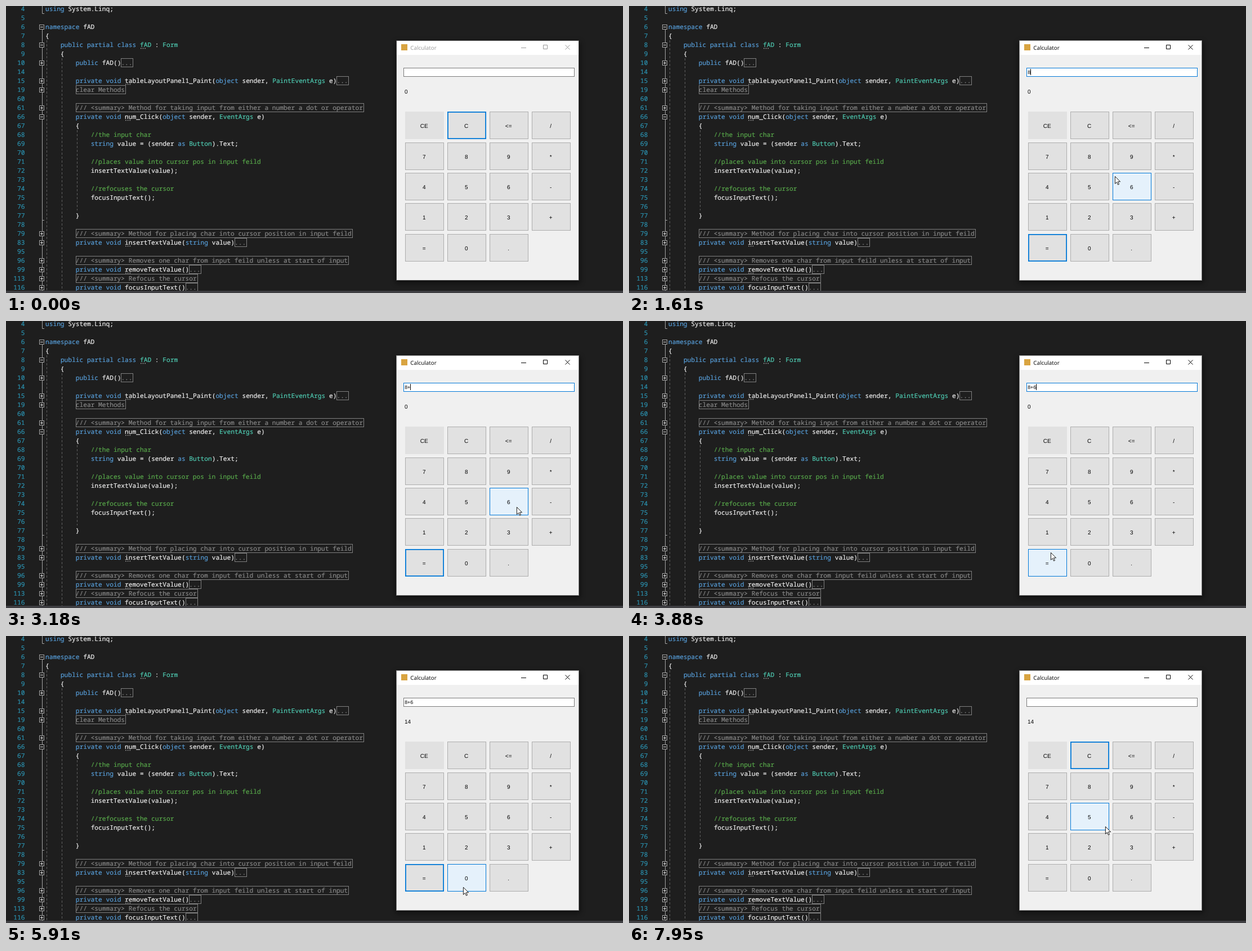
An HTML page that plays this animation: 1096 px wide and 511 px high, repeating every 8 s.

```html
<!DOCTYPE html>
<html lang="en">
<head>
<meta charset="utf-8">
<title>Calculator</title>
<style>
  html, body { margin: 0; width: 100%; height: 100%; overflow: hidden; background: #1e1e1e; }
  svg { display: block; width: 100vw; height: 100vh; }
  text { white-space: pre; text-rendering: geometricPrecision; }
  .code text { font: 11.2px "Noto Sans Mono", "DejaVu Sans Mono", monospace; stroke-width: .22px; }
  .ui text { font: 10px "Liberation Sans", Arial, sans-serif; }
  .ui .title { font: 9.9px "Open Sans", "Noto Sans", sans-serif; }
  .ui .typed { font-size: 8.9px; }
</style>
</head>
<body>
<svg viewBox="0 0 1096 511">
  <defs>
    <filter id="blur" x="-20%" y="-20%" width="140%" height="140%"><feGaussianBlur stdDeviation="5"/></filter>
  </defs>
  <rect width="1096" height="511" fill="#1e1e1e"/>
  <g class="code" id="code"></g>
  <rect y="507" width="1096" height="4" fill="#3e3e42"/>
  <g class="ui" id="ui"></g>
</svg>
<script>
const LOOP = 8000, STEP = 78.1, FIRST_STEP = 275;
const CHAR = 6.72, LEFT = 70, LINE = 16;
const BLUE = '#0078d7';
const code = document.getElementById('code');
const ui = document.getElementById('ui');

function add(parent, tag, attrs, text) {
  const el = document.createElementNS('http://www.w3.org/2000/svg', tag);
  set(el, attrs);
  if (text !== undefined) el.textContent = text;
  return parent.appendChild(el);
}
function set(el, attrs) {
  for (const key in attrs) el.setAttribute(key, attrs[key]);
}
const path = (parent, d, stroke, extra) => add(parent, 'path', { d, stroke, fill: 'none', ...extra });
const codeText = (x, y, fill, text, extra) => add(code, 'text', { x, y: y + 3.8, fill, stroke: fill, ...extra }, text);

// Editor: number | fold sign | code, with collapsed parts in square brackets
const listing = `4||using System.Linq;
5||
6|-|namespace fAD
7||{
8|-|    public partial class fAD : Form
9||    {
10|+|        public fAD()[...]
14||
15|+|        private void tableLayoutPanel1_Paint(object sender, PaintEventArgs e)[...]
19|+|        [clear Methods]
60||
61|+|        [/// <summary> Method for taking input from either a number a dot or operator]
66|-|        private void num_Click(object sender, EventArgs e)
67||        {
68||            //the input char
69||            string value = (sender as Button).Text;
70||
71||            //places value into cursor pos in input feild
72||            insertTextValue(value);
73||
74||            //refocuses the cursor
75||            focusInputText();
76||
77||        }
78||
79|+|        [/// <summary> Method for placing char into cursor position in input feild]
83|+|        private void insertTextValue(string value)[...]
95||
96|+|        [/// <summary> Removes one char from input feild unless at start of input]
99|+|        private void removeTextValue()[...]
113|+|        [/// <summary> Refocus the cursor]
116|+|        private void focusInputText()[...]`;

const keyword = /^(using|namespace|public|partial|class|private|void|object|string|as)$/;
const type = /^(Form|PaintEventArgs|EventArgs|Button)$/;
const token = /(\[.*?\]|\/\/.*|\w+)/;

function color(piece, before) {
  if (piece.startsWith('//')) return '#57a64a';
  if (keyword.test(piece)) return '#569cd6';
  if (type.test(piece) || before.endsWith('class ')) return '#4ec9b0';
  return '#ececec';
}

function drawCode(line, y) {
  let done = '';
  for (let piece of line.split(token)) {
    const x = LEFT + done.length * CHAR;
    let fill = color(piece, done);
    if (piece[0] === '[') {
      piece = piece.slice(1, -1);
      fill = '#858585';
      add(code, 'rect', { x: Math.round(x) + .5, y: y - 7.5, width: Math.ceil(piece.length * CHAR), height: 15, fill: 'none', stroke: '#808080' });
    }
    if (piece.trim()) codeText(x, y, fill, piece);
    done += piece;
  }
}

function drawEditor() {
  const guide = { 'stroke-dasharray': '4 3' };
  path(code, 'M72.5 61V507M99.5 93V507M126.5 221V364', '#5f5f5f', guide);
  path(code, 'M64.5 0V13.5H68M64.5 38V507M64.5 381.5H68', '#a5a5a5');
  listing.split('\n').forEach((row, i) => {
    const [number, sign, line] = row.split('|');
    const y = 5 + LINE * i;
    codeText(33.5, y, '#2b91af', number, { 'text-anchor': 'end' });
    if (sign) {
      add(code, 'rect', { x: 59.5, y: y - 3.5, width: 8, height: 8, fill: '#1e1e1e', stroke: '#a5a5a5' });
      path(code, `M61 ${y + .5}h5` + (sign === '+' ? `m-2.5 -2.5v5` : ''), '#dcdcdc');
    }
    drawCode(line, y);
    const named = line.match(/class |void (?!focus)/);
    if (named) {
      const x = LEFT + (named.index + named[0].length) * CHAR;
      path(code, `M${x + 1} ${y + 6.5}h9`, '#a8a8a8', { 'stroke-width': 1.5, 'stroke-dasharray': '1.6 2.1' });
    }
  });
}
drawEditor();

// Calculator window
add(ui, 'rect', { x: 692, y: 64, width: 328, height: 429, fill: '#000', filter: 'url(#blur)', opacity: .5 });
const frame = add(ui, 'rect', { x: 693.5, y: 61.5, width: 324, height: 427, fill: '#f0f0f0' });
add(ui, 'rect', { x: 694, y: 62, width: 323, height: 25, fill: '#fff' });
add(ui, 'rect', { x: 702, y: 68, width: 11, height: 11, fill: '#d9a441' });
const title = add(ui, 'text', { x: 718.3, y: 78, class: 'title' }, 'Calculator');
const controls = path(ui, 'M915 74.5h9M954.5 69.5h7v7h-7zM993.5 69.5l8 8m0 -8l-8 8', '#000');
const field = add(ui, 'rect', { x: 706.5, y: 110.5, width: 303, height: 15, fill: '#fff' });
const typed = add(ui, 'text', { x: 708.2, y: 121, class: 'typed' });
const caret = path(ui, 'M.5 112V123', '#000');
const result = add(ui, 'text', { x: 708, y: 155.5 });

const buttons = ['CE', 'C', '<=', '/', ...'789*456-123+=0.'].map((label, i) => {
  const x = 709 + 75 * (i % 4);
  const y = Math.floor(188.8 + 54.35 * Math.floor(i / 4));
  const face = add(ui, 'rect', {});
  add(ui, 'text', { x: x + 33.7, y: y + 28.5, 'text-anchor': 'middle' }, label);
  return { label, x, y, face };
});
const pointer = add(ui, 'path', {
  d: 'M.4 .4V13.4L3.4 10.6L5.5 15.2L7.5 14.3L5.4 9.8H9.6Z', fill: '#fff', stroke: '#000', 'stroke-width': .9
});

const states = [
  { at: -9, focus: 'C', text: '', answer: '0' },
  { at: 14, focus: '8', press: true },
  { at: 16, focus: 'field', press: false, text: '8' },
  { at: 29, focus: '+', press: true },
  { at: 31, focus: 'field', press: false, text: '8+' },
  { at: 39, focus: '6', press: true },
  { at: 41, focus: 'field', press: false, text: '8+6' },
  { at: 55, focus: '=', press: true },
  { at: 57, press: false, answer: '14' },
  { at: 90, focus: 'C', press: true },
  { at: 92, press: false, text: '' }
];
const route = [
  [0, 987, 469], [3, 940, 440], [6, 880, 380], [10, 832, 274], [15, 832, 274], [16, 838, 280],
  [17, 863, 303], [20, 900, 335], [26, 955, 376], [28, 958, 380], [31, 958, 380], [34, 922, 342],
  [36, 910, 333], [37, 907, 331], [41, 907, 331], [46, 749, 412], [48, 760, 434], [50, 755, 440.5],
  [65, 755, 440.5], [69, 780, 451], [72, 812, 447], [75, 812, 447], [79, 930, 400], [82, 982, 303],
  [86, 838, 262], [87, 832, 232], [89, 822, 215], [95, 822, 215], [98, 846, 339]
];

function pointerAt(n) {
  const i = route.findIndex(key => key[0] >= n);
  const [n1, x1, y1] = route[i < 0 ? route.length - 1 : i];
  const [n0, x0, y0] = route[Math.max(i, 1) - 1];
  const k = i < 1 ? 1 : (n - n0) / (n1 - n0);
  return [x0 + (x1 - x0) * k, y0 + (y1 - y0) * k];
}

function faceStyle(b, state, hovered, strong) {
  if (hovered && state.press) return ['#cce4f7', '#005499', 1];
  if (hovered) return ['#e5f1fb', BLUE, 1];
  if (strong) return ['#e1e1e1', BLUE, 1.8];
  return ['#e1e1e1', b.label === 'CE' ? '#e1e1e1' : '#adadad', 1];
}

function draw(t) {
  const n = Math.floor((t - FIRST_STEP) / STEP);
  const state = Object.assign({}, ...states.filter(s => s.at <= n));
  const active = n >= 14;
  const typing = state.focus === 'field';
  const [px, py] = n < 0 ? [-50, -50] : pointerAt(n);

  set(frame, { stroke: active ? '#808080' : '#444' });
  set(title, { fill: active ? '#000' : '#999' });
  set(controls, { stroke: active ? '#000' : '#999' });
  set(field, { stroke: typing ? BLUE : '#7a7a7a' });
  typed.textContent = state.text;
  result.textContent = state.answer;

  const blinkOn = Math.floor((n - state.at) * STEP / 540) % 2 === 0;
  set(caret, {
    transform: `translate(${708 + 5 * state.text.length})`,
    visibility: typing && blinkOn ? 'visible' : 'hidden'
  });

  for (const b of buttons) {
    const hovered = px >= b.x && px < b.x + 69 && py >= b.y && py < b.y + 49;
    const strong = b.label === (typing ? '=' : state.focus);
    const [fill, stroke, w] = faceStyle(b, state, hovered, strong);
    set(b.face, { x: b.x + w / 2, y: b.y + w / 2, width: 69 - w, height: 49 - w, fill, stroke, 'stroke-width': w });
  }
  set(pointer, { transform: `translate(${px} ${py})` });
}

const start = performance.now();
function tick() {
  draw((performance.now() - start) % LOOP);
  requestAnimationFrame(tick);
}
tick();
</script>
</body>
</html>
```
